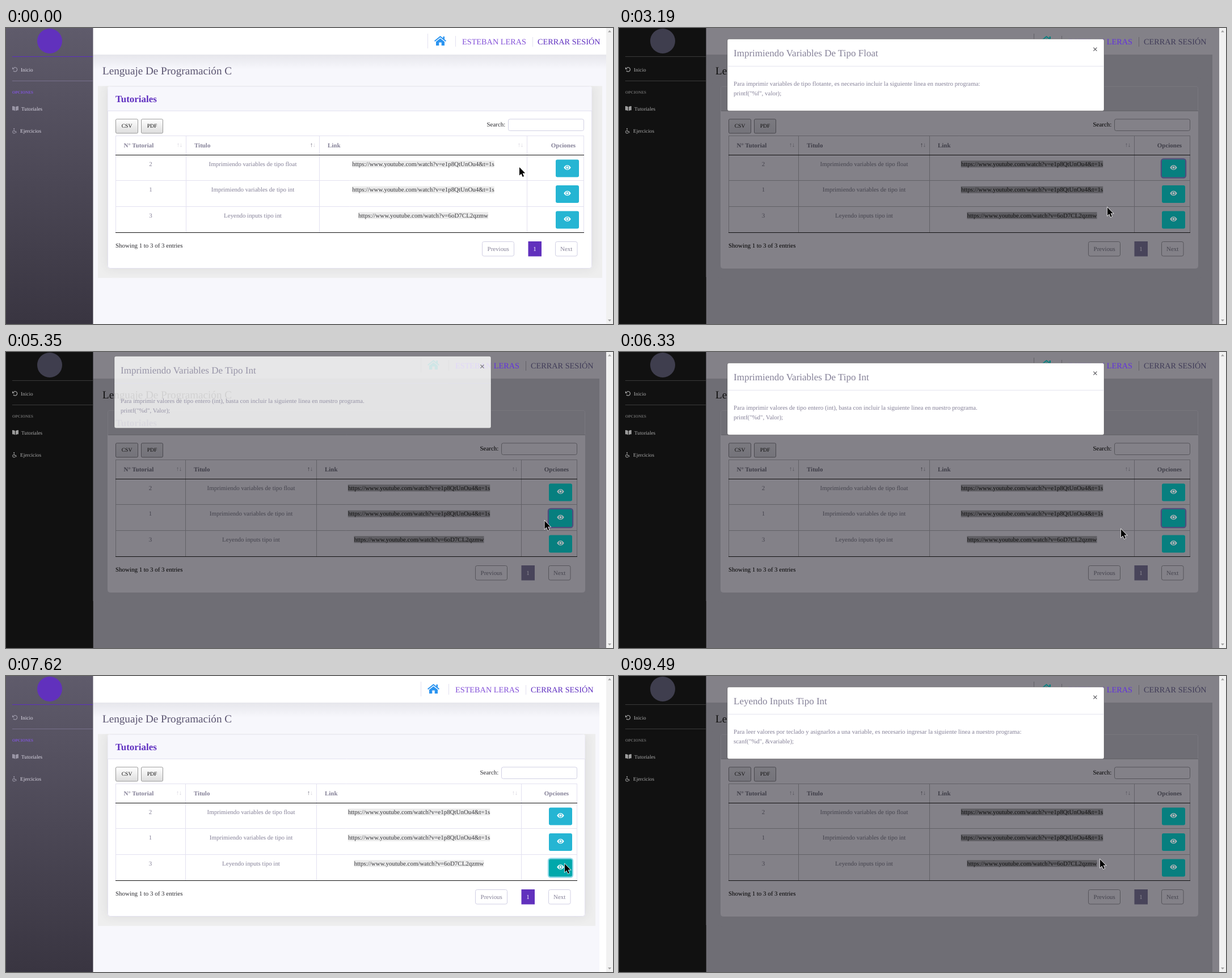
An HTML page with a canvas for the animation above (9530 ms loop, 1070 by 523 pixels).

```html
<!DOCTYPE html>
<html lang="es">
<head>
<meta charset="utf-8">
<title>Tutoriales</title>
<style>
html, body { margin: 0; width: 100%; height: 100%; overflow: hidden; }
canvas { display: block; }
</style>
</head>
<body>
<canvas id="stage" width="1070" height="523"></canvas>
<script>
const g = document.getElementById('stage').getContext('2d');
const LOOP = 9530, REM = 10.95, PITCH = 45.5;

// Each colour: clear page, light backdrop, full backdrop
const COLORS = {
  page: ['#f7f7fc', '#d9d5e9', '#6f6e75'],
  white: ['#ffffff', '#dddddd', '#838188'],
  shadow: ['#eeeeee', '#cfcfcf', '#6f6e75'],
  sideTop: ['#5f5b6b', '#55505f', '#111111'],
  sideEnd: ['#393541', '#332f3b', '#111111'],
  logo: ['#6131bd', '#6131bd', '#3f3e4e'],
  rule1: ['#5c2fc0', '#716d7c', '#3a3a3a'],
  rule2: ['#77708c', '#86838e', '#3a3a3a'],
  nav: ['#d9d6e2', '#d2cfda', '#aaaaaa'],
  navIcon: ['#9a96a6', '#7045d0', '#9c9c9c'],
  navHead: ['#8156da', '#9188ab', '#6c6c6c'],
  title: ['#5a5470', '#57516a', '#111111'],
  accent: ['#5f2fc0', '#5f2fc0', '#403c58'],
  user: ['#8350d8', '#6636c4', '#6230e0'],
  home: ['#2b94f0', '#22b2d8', '#077f7f'],
  line: ['#e3e1f0', '#c6c4cb', '#626167'],
  field: ['#d1d0e4', '#a9a2cf', '#56555b'],
  muted: ['#858198', '#6a58a8', '#45444e'],
  number: ['#858198', '#77747f', '#45444e'],
  head: ['#858198', '#5a32b5', '#3f3e48'],
  ink: ['#2b2b30', '#1c1c20', '#000000'],
  black: ['#111111', '#111111', '#111111'],
  link: ['#3a3a3e', '#2a2a2e', '#111111'],
  linkBg: ['#ebebeb', '#cbcbcb', '#5f5e63'],
  sort: ['#d4d2dc', '#b9b8bf', '#55545b'],
  sorted: ['#6d6a7c', '#55535e', '#333238'],
  toolTop: ['#ffffff', '#dddddd', '#7b7a80'],
  toolEnd: ['#dddddd', '#c8c8c8', '#74737a'],
  toolLine: ['#999999', '#8c8c8c', '#4a494f'],
  button: ['#25b5d3', '#00a8ab', '#077f7f'],
  ring: ['#93d8e8', '#7cc0cf', '#514c7c'],
  eye: ['#ffffff', '#e4f4f4', '#b4b4b8'],
  active: ['#6131bd', '#6131bd', '#48445a'],
  activeText: ['#ffffff', '#dddddd', '#8f8d96']
};

const URL_A = 'https://www.youtube.com/watch?v=e1p8QtUnOu4&t=1s';
const ROWS = [
  ['2', 'Imprimiendo variables de tipo float', URL_A],
  ['1', 'Imprimiendo variables de tipo int', URL_A],
  ['3', 'Leyendo inputs tipo int', 'https://www.youtube.com/watch?v=6oD7CL2qzmw']
];

const MODALS = [
  { click: 2590, open: 2790, blur: 3960, close: 3970, title: 'Imprimiendo Variables De Tipo Float',
    body: ['Para imprimir variables de tipo flotante, es necesario incluir la siguiente linea en nuestro programa:', 'printf("%f", valor);'] },
  { click: 4990, open: 5130, blur: 6390, close: 6390, title: 'Imprimiendo Variables De Tipo Int',
    body: ['Para imprimir valores de tipo entero (int), basta con incluir la siguiente linea en nuestro programa.', 'printf("%d", Valor);'] },
  { click: 7560, open: 7690, blur: 9430, close: LOOP, title: 'Leyendo Inputs Tipo Int',
    body: ['Para leer valores por teclado y asignarlos a una variable, es necesario ingresar la siguiente linea a nuestro programa:', 'scanf("%d", &variable);'] }
];

const POINTER = [
  [0, 905, 246], [570, 905, 246], [850, 915, 246], [1080, 915, 246], [1320, 938, 246],
  [1900, 938, 246], [2320, 995, 246], [2790, 995, 246], [3190, 861, 317], [3960, 861, 317],
  [4380, 908, 304], [4860, 985, 290], [5130, 985, 290], [5680, 885, 313], [6330, 885, 313],
  [7250, 985, 332], [7690, 985, 332], [8250, 848, 324], [LOOP, 848, 324]
];

const clamp = v => Math.max(0, Math.min(1, v));
const lerp = (a, b, p) => a + (b - a) * p;
const smooth = p => p * p * (3 - 2 * p);

let dim = 0; // backdrop strength, 0 to 1
const channels = hex => [1, 3, 5].map(i => parseInt(hex.substr(i, 2), 16));

function color(name) {
  const i = dim < 0.27 ? 0 : 1;
  const p = i ? (dim - 0.27) / 0.73 : dim / 0.27;
  const a = channels(COLORS[name][i]), b = channels(COLORS[name][i + 1]);
  return `rgb(${a.map((v, n) => Math.round(lerp(v, b[n], p)))})`;
}

function rect(x, y, w, h, fill) {
  g.fillStyle = fill;
  g.fillRect(x, y, w, h);
}

function box(x, y, w, h, r, fill, stroke, width = 1) {
  g.beginPath();
  g.roundRect(x, y, w, h, r);
  if (fill) { g.fillStyle = fill; g.fill(); }
  if (stroke) { g.strokeStyle = stroke; g.lineWidth = width; g.stroke(); }
}

function line(x1, y1, x2, y2, stroke, width = 1) {
  g.beginPath();
  g.moveTo(x1, y1);
  g.lineTo(x2, y2);
  g.strokeStyle = stroke;
  g.lineWidth = width;
  g.stroke();
}

// y is the middle of the capitals
function text(s, x, y, size, fill, align = 'left', bold = false) {
  g.font = `${bold ? 'bold ' : ''}${size}px "Liberation Serif", "Times New Roman", serif`;
  g.textAlign = align;
  g.fillStyle = fill;
  g.fillText(s, x, y + size * 0.33);
}

function shape(d, x, y, fill, stroke, width) {
  const path = new Path2D(d);
  g.save();
  g.translate(x, y);
  if (stroke) { g.strokeStyle = stroke; g.lineWidth = width; g.stroke(path); }
  if (fill) { g.fillStyle = fill; g.fill(path); }
  g.restore();
}

function vertical(y1, y2, top, end) {
  const fade = g.createLinearGradient(0, y1, 0, y2);
  fade.addColorStop(0, top);
  fade.addColorStop(1, end);
  return fade;
}

function sidebar() {
  rect(0, 0, 153.5, 523, vertical(0, 523, color('sideTop'), color('sideEnd')));
  if (dim > 0) rect(0, 440, 153.5, 83, '#111');
  g.beginPath();
  g.arc(77, 23, 22, 0, 7);
  g.fillStyle = color('logo');
  g.fill();
  line(11, 50.5, 153, 50.5, color('rule1'));
  line(11, 93.5, 153, 93.5, color('rule2'));
  const icon = color('navIcon'), nav = color('nav');
  shape('M2.5 1.5A3.7 3.7 0 1 1 2 6.5', 11, 69, null, icon, 1.3);
  shape('M0 0V4H4Z', 11, 69, icon);
  shape('M0 0Q3 0 5 1.2V8.5Q3 7.3 0 7.3ZM6 1.2Q8 0 11 0V7.3Q8 7.3 6 8.5Z', 11, 138, icon);
  shape('M3.2 2.5L3.6 5.5H6.2L7.4 8.3M2.3 4.2A2.5 2.5 0 1 0 5.6 7.3', 11, 177, null, icon, 1.1);
  shape('M2.1 1a1.1 1.1 0 1 0 2.2 0a1.1 1.1 0 1 0-2.2 0', 11, 177, icon);
  text('Inicio', 26, 73.5, 9.25, nav);
  text('OPCIONES', 11, 114, 7.1, color('navHead'), 'left', true);
  text('Tutoriales', 27, 142.5, 9.25, nav);
  text('Ejercicios', 25, 181.5, 9.25, nav);
}

function topbar(d) {
  const right = 1058 - d;
  if (dim > 0) rect(153.5, 47, right - 153.5, 18, color('shadow'));
  else rect(153.5, 47, right - 153.5, 26, vertical(47, 73, 'rgba(58,59,69,.09)', 'rgba(58,59,69,0)'));
  rect(153.5, 0, right - 153.5, 47, color('white'));
  line(743.5 - d, 10, 743.5 - d, 36, color('line'));
  line(792.5 - d, 14, 792.5 - d, 33, color('line'));
  line(928.5 - d, 16, 928.5 - d, 33, color('line'));
  shape('M10.5 0L15.5 4V1H18V6L21 8.6L19.8 10L10.5 2.5L1.2 10L0 8.6Z' +
    'M10.5 4.2L18 10.2V17H12.7V11.5H8.3V17H3V10.2Z', 755 - d, 14, color('home'));
  text('ESTEBAN LERAS', 804 - d, 24, 14.28, color('user'));
  text('CERRAR SESIÓN', 937 - d, 24, 14.28, color('accent'));
}

function card(d) {
  const right = 1033 - d;
  if (dim > 0) {
    box(162, 87, 889 - d, 356, 22, color('shadow'));
  } else {
    g.save();
    g.beginPath();
    g.rect(162, 102.5, 889 - d, 339);
    g.clip();
    rect(162, 102, 889 - d, 340, color('shadow'));
    g.shadowColor = 'rgba(58,59,69,.12)';
    g.shadowBlur = 18;
    box(179, 103, right - 179, 321, 4, '#fff');
    g.restore();
  }
  box(179.5, 103.5, right - 180, 321, 4, color('white'), color(dim > 0 ? 'white' : 'line'));
  box(179.5, 103.5, right - 180, 43, [4, 4, 0, 0], color('page'));
  line(180, 146.5, right, 146.5, color('line'));
  text('Tutoriales', 193, 125, 16.95, color('accent'), 'left', true);
}

function tool(label, x, w) {
  box(x + 0.5, 161, w, 25, 2, vertical(161, 186, color('toolTop'), color('toolEnd')), color('toolLine'));
  text(label, x + 0.5 + w / 2, 173, 9.64, color('black'), 'center');
}

function eyeButton(x, y, hover, focus) {
  const fill = hover ? COLORS.button[1] : color('button');
  if (focus) box(x - 1, y - 1, 43, 33, 4, null, color('ring'), 2.4);
  box(x, y, 41, 31, 3, fill);
  const cx = x + 20.5, cy = y + 14;
  shape('M-6.2 0Q-3.6 -4.3 0 -4.3T6.2 0Q3.6 4.3 0 4.3T-6.2 0Z', cx, cy, color('eye'));
  shape('M-3.1 0a3.1 3.1 0 1 0 6.2 0a3.1 3.1 0 1 0-6.2 0', cx, cy, fill);
  shape('M-2 0a2 2 0 1 0 4 0a2 2 0 1 0-4 0', cx, cy, color('eye'));
}

function table(d, mouse, focused) {
  const cols = d ? [316.5, 547.5, 908.5] : [317.5, 552.5, 918.5];
  const right = 1018.5 - d, grid = color('line');
  const titleX = (cols[0] + cols[1]) / 2, linkX = (cols[1] + cols[2]) / 2;
  const header = (s, x, align) => text(s, x, 207, REM, color('head'), align, true);

  line(193, 190.5, right, 190.5, grid);
  [193.5, ...cols, right].forEach(x => line(x, 190, x, 361, grid));
  header('N° Tutorial', 207.5);
  header('Titulo', cols[0] + 14.5);
  header('Link', cols[1] + 14.5);
  header('Opciones', right - 14.5, 'right');
  cols.forEach((x, i) => {
    text('↑', x - 14, 206, REM, color(i === 1 ? 'sorted' : 'sort'), 'center');
    text('↓', x - 9, 206, REM, color('sort'), 'center');
  });

  ROWS.forEach(([number, title, url], i) => {
    const y = 240.3 + i * PITCH, top = 232.5 + i * PITCH, left = 969 - d;
    if (i) line(193, Math.round(224 + i * PITCH) + 0.5 - i % 2, right, Math.round(224 + i * PITCH) + 0.5 - i % 2, grid);
    text(number, 255 - d / 20, y, REM, color('number'), 'center');
    text(title, titleX, y, REM, color('muted'), 'center');
    g.font = `${REM}px "Liberation Serif", "Times New Roman", serif`;
    const w = g.measureText(url).width;
    rect(linkX - w / 2, y - 6, w, 12, color('linkBg'));
    text(url, linkX, y, REM, color('link'), 'center');
    const hover = dim === 0 && mouse.x > left && mouse.x < left + 41 && mouse.y > top && mouse.y < top + 31;
    eyeButton(left, top, hover || (focused === i && dim === 0), focused === i);
  });
  line(193, 224.5, right + 0.5, 224.5, color('black'));
  line(193, 361.5, right + 0.5, 361.5, color('black'));
}

function pager(d) {
  text('Showing 1 to 3 of 3 entries', 193, 384, REM, color('ink'));
  box(839.5 - d, 377.5, 56, 25.5, 3, null, color('field'));
  box(968.5 - d, 377.5, 38.5, 25.5, 3, null, color('field'));
  rect(920.5 - d, 377, 23.5, 26.5, color('active'));
  text('Previous', 867.7 - d, 390.5, REM, color('muted'), 'center');
  text('1', 932 - d, 390.5, REM, color('activeText'), 'center');
  text('Next', 987.7 - d, 390.5, REM, color('muted'), 'center');
}

function scrollbar() {
  rect(1058, 0, 12, 523, '#f1f1f1');
  shape('M0 3.5L3 0L6 3.5Z', 1061, 4, '#a3a3a3');
  shape('M0 0L3 3.5L6 0Z', 1061, 515, '#a3a3a3');
}

function dialog({ title, body }, alpha, drop) {
  g.save();
  g.globalAlpha = alpha;
  g.translate(0, -34 * (1 - drop));
  box(191, 19.5, 664, 127, 3, '#fff', 'rgba(0,0,0,.25)');
  line(191.5, 67.5, 854.5, 67.5, '#e3e3ee');
  text(title, 202, 44, 17, '#858198');
  text('×', 839.5, 37.5, 16.4, '#5c5c60', 'center', true);
  body.forEach((s, i) => text(s, 202, 98.5 + i * 17, REM, '#858198'));
  g.restore();
}

function pointerAt(t) {
  const i = Math.max(1, POINTER.findIndex(p => p[0] > t));
  const a = POINTER[i - 1], b = POINTER[i];
  const p = smooth((t - a[0]) / (b[0] - a[0]));
  return { x: lerp(a[1], b[1], p), y: lerp(a[2], b[2], p) };
}

function focusAt(t) {
  const i = MODALS.findLastIndex(m => t >= m.click);
  if (i < 0) return -1;
  const { blur, close } = MODALS[i];
  return t < blur || t > close + 450 ? i : -1;
}

function draw(t) {
  const current = MODALS.findLast(m => t >= m.open);
  const d = current ? 12 : 0; // room left for the dialog's scrollbar
  const mouse = pointerAt(t);
  dim = current ? clamp((t - current.open) / 150) - clamp((t - current.close - 300) / 150) : 0;

  rect(0, 0, 1070, 523, color('white'));
  rect(153.5, 0, 904.5 - d, 523, color('page'));
  topbar(d);
  card(d);
  text('Lenguaje De Programación C', 170, 75.3, 19.15, color('title'));
  tool('CSV', 193, 39);
  tool('PDF', 238, 38);
  text('Search:', 847.5 - d, 170.5, REM, color('ink'));
  box(885.5 - d, 161, 133, 20.5, 3, null, color('field'));
  table(d, mouse, focusAt(t));
  pager(d);
  sidebar();
  scrollbar();

  if (current) {
    const enter = t - current.open - 100, leave = t - current.close;
    const alpha = clamp(enter / 150) - clamp(leave / 150);
    const drop = 1 - (1 - clamp(enter / 300)) ** 2 - clamp(leave / 300) ** 2;
    if (alpha > 0) dialog(current, alpha, drop);
  }
  shape('M0 0V14.5L3.3 11.4L5.7 17L8 16L5.6 10.6H10.2Z', mouse.x, mouse.y, '#000', '#fff', 1.4);
}

g.textRendering = 'geometricPrecision';
const start = performance.now();
function tick() {
  draw((performance.now() - start) % LOOP);
  requestAnimationFrame(tick);
}
tick();
</script>
</body>
</html>
```
